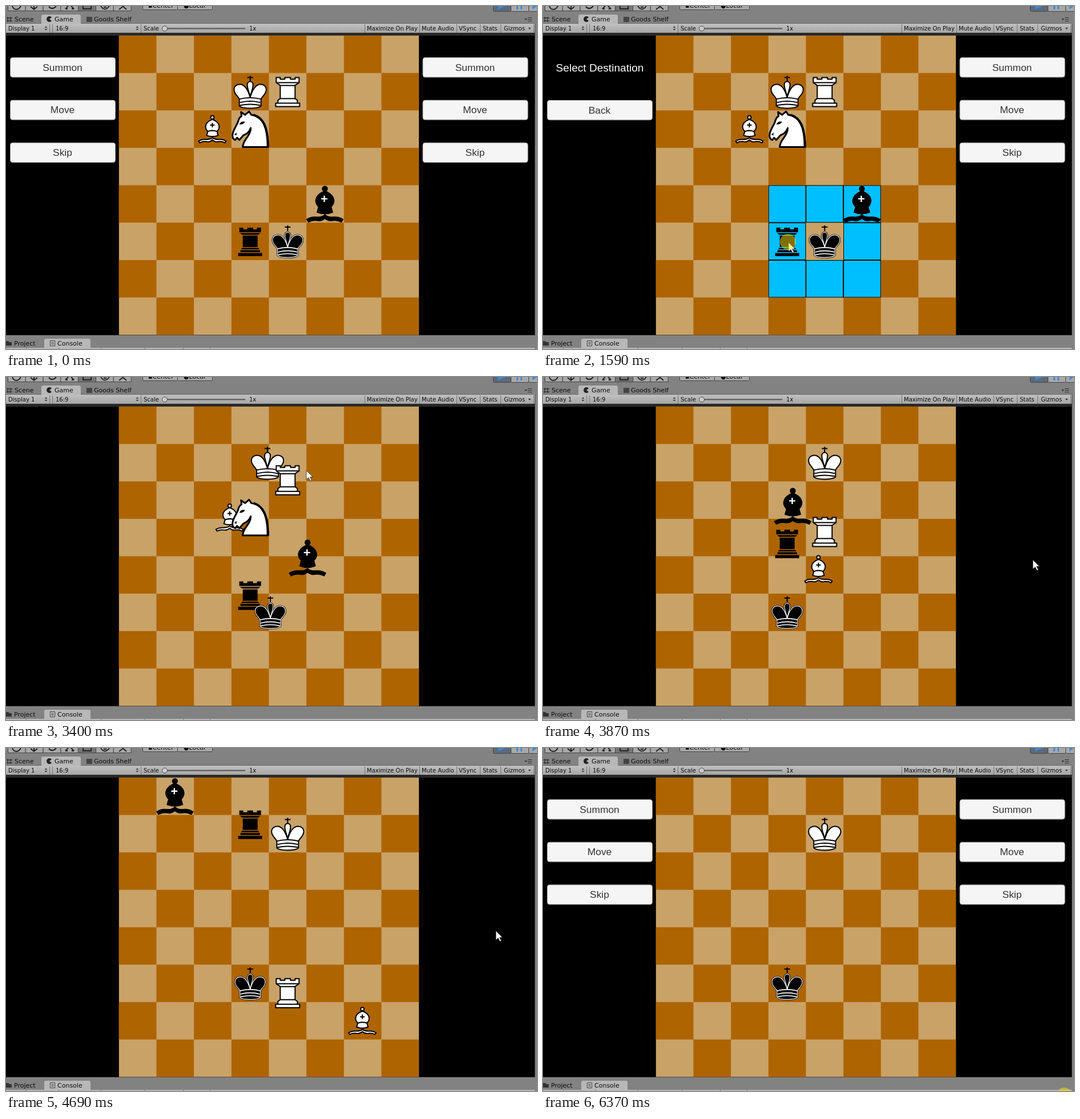
An HTML page that plays this animation: 930x602 px, repeating every 6470 ms.

```html
<!DOCTYPE html>
<html lang="en">
<head>
<meta charset="utf-8">
<title>Chess skirmish</title>
<style>
  html, body { margin: 0; height: 100%; overflow: hidden; background: #828282; }
  svg { display: block; width: 100vw; height: 100vh; }
  .ui { font: 10px "DejaVu Sans", sans-serif; fill: #0c0c0c; }
  .tab { font-size: 11px; }
  .panel { font: 17.4px "Liberation Sans", Arial, sans-serif; text-anchor: middle; fill: #323232; }
  .panel rect { fill: #f5f5f5; stroke: #9a9a9a; }
  .panel .label { font-size: 19.1px; fill: #fff; }
  .ring rect { fill: #00bfff; stroke: #000; }
  .white { fill: #fff; stroke: #000; stroke-width: 2; stroke-linejoin: round; }
  .black { fill: #000; }
  .line { fill: none; }
</style>
</head>
<body>
<svg id="stage" viewBox="0 0 930 602" preserveAspectRatio="none">
  <defs>
    <linearGradient id="bar" x2="0" y2="1"><stop stop-color="#c0c0c0"/><stop offset="1" stop-color="#a6a6a6"/></linearGradient>
    <g id="crown">
      <path d="M0 10C-4-4-10-13-18-13C-25-13-29-8-28-2C-27 5-21 8-19 13V25Q-15 29 0 29T19 25V13C21 8 27 5 28-2C29-8 25-13 18-13C10-13 4-4 0 10Z"/>
      <path d="M0 10C-1 2-5-5-5-12C-5-20 5-20 5-12C5-5 1 2 0 10Z"/>
    </g>
    <path id="bands" d="M-19 13Q0 8 19 13M-18 19Q0 14 18 19M-18 24Q0 20 18 24"/>
    <path id="cross" d="M0-28V-18M-5-25H5" fill="none" stroke="#000" stroke-width="2"/>
    <g id="bishop">
      <path d="M0 15C-4 19-9 18-14 18Q-19 18-24 21L-22 24Q-16 21-11 22C-6 23-3 22 0 19C3 22 6 23 11 22Q16 21 22 24L24 21Q19 18 14 18C9 18 4 19 0 15Z"/>
      <path d="M-8 4L-10 11Q0 15 10 11L8 4Q0 1-8 4Z"/>
      <path d="M-8 4C-16-4-11-13 0-17C11-13 16-4 8 4Q0 1-8 4Z"/>
      <circle cy="-20.500" r="3"/>
    </g>

    <g id="whiteKing" class="white"><use href="#cross"/><use href="#crown"/><use href="#bands" class="line"/></g>
    <g id="blackKing" class="black" stroke-linejoin="round">
      <use href="#cross"/>
      <g transform="translate(0 1) scale(.94)">
        <use href="#crown" stroke="#000" stroke-width="3"/>
        <use href="#crown" stroke="#fff" stroke-width="1.200"/>
        <use href="#bands" class="line" stroke="#fff" stroke-width="1.800"/>
      </g>
    </g>
    <g id="whiteRook" class="white">
      <path d="M-20-25H-13V-22H-5V-25H5V-22H13V-25H20V-16L13-11V12L17 15V20H21V26H-21V20H-17V15L-13 12V-11L-20-16Z"/>
      <path class="line" d="M-19-16H19M-13-11H13M-13 12H13M-17 20H17"/>
    </g>
    <path id="blackRook" class="black" d="M-19-24H-12V-21H-5V-24H5V-21H12V-24H19V-16H-19ZM-18-14.500H18L14-11.500H-14ZM-13-10H13V10H-13ZM-14 11.500H14L16 14H-16ZM-17 15.500H17V19H-17ZM-21 20.500H21V26H-21Z"/>
    <g id="whiteBishop" class="white" transform="translate(-.5)"><use href="#bishop"/><path d="M-4-7H4M0-11V-3"/></g>
    <g id="blackBishop" class="black" transform="translate(-.5)">
      <use href="#bishop" transform="scale(1.3)" stroke="#000" stroke-width="2"/>
      <path d="M-6.500-9H4.500M-1-14.500V-3.500" stroke="#fff" stroke-width="2.400"/>
    </g>
    <g id="knight" class="white">
      <path stroke-width="3" d="M-16-30L-9-25L-2-31L2-25C20-23 31-5 31.500 31.500H-13C-13 18 1 13 1-2C-2 7-8 9-12 11L-19 19L-23 15L-26 19Q-31 18-31 11C-31 2-22-8-21-14Q-19-21-15-23Z"/>
      <path class="line" stroke-width="4" d="M6-25C22-20 31-5 31 31"/>
      <path class="black" stroke="none" d="M-19-8Q-16-15-9-13Q-11-8-19-8ZM-28 10L-24 6L-24 11Z"/>
    </g>
  </defs>

  <rect width="930" height="602" fill="#828282"/>
  <g id="toolbar" stroke="#444"></g>
  <path d="M11 0Q13 6 18 6T26 0M43 1L49 6L55 1M49 0V5M75 1Q81 8 88 0M104 5L109 0M119 5L114 0M104 5H108M119 5H115M135 0V5H149V0M166 0Q173 11 181 0M171 2H176M198 6L206 0M211 6L204 0" fill="none" stroke="#222" stroke-width="2"/>
  <g class="ui tab"><text x="249" y="3">▪Center</text><text x="311" y="3">●Local</text></g>
  <path d="M862 0L875 0L862 6Z M894 0H897V6H894Z M901 0H904V6H901Z M922 0H930L922 6Z" fill="#3f8ad8"/>

  <path d="M62 31V18Q62 15 65 15H128Q131 15 131 18V31Z" fill="#b8b8b8"/>
  <rect y="31" width="926" height="16" fill="url(#bar)"/>
  <path d="M0 30.500H62M131 30.500H926" stroke="#666"/>
  <path d="M76.500 32V47M81.500 32V47M236.500 32V47M628.500 32V47M724.500 32V47M789.500 32V47M830.500 32V47M866.500 32V47M924.500 32V47" stroke="#757575"/>
  <path d="M3 19V28M8 19V28M1 21H11M1 26H11" stroke="#333" stroke-width="1.300"/>
  <path d="M80 20A5 5 0 1 0 80 26L76 23Z" fill="#222"/>
  <rect x="141" y="19" width="10" height="9" fill="#444"/>
  <g class="ui tab" fill="#222">
    <text x="15" y="27">Scene</text><text x="85" y="27">Game</text><text x="154" y="27">Goods Shelf</text>
  </g>
  <path d="M908 22H913L910.500 25ZM914 20H921V21H914ZM914 23H921V24H914ZM914 26H921V27H914ZM914.500 38H919.500L917 41ZM67.500 38H72.500L70 35.500ZM67.500 40H72.500L70 42.500ZM227.500 38H232.500L230 35.500ZM227.500 40H232.500L230 42.500Z" fill="#333"/>
  <g class="ui">
    <text x="4" y="43">Display 1</text><text x="87" y="43">16:9</text><text x="241" y="43">Scale</text><text x="426" y="43">1x</text>
    <text x="632" y="43">Maximize On Play</text><text x="728" y="43">Mute Audio</text><text x="793" y="43">VSync</text>
    <text x="835" y="43">Stats</text><text x="872" y="43">Gizmos</text>
  </g>
  <path d="M278 39.500H419" stroke="#555" stroke-width="2"/>
  <circle cx="278" cy="39.500" r="4.500" fill="#ccc" stroke="#444"/>

  <rect y="47" width="926" height="531" fill="#282828"/>
  <rect y="52" width="926" height="525" fill="#000"/>
  <path d="M926.500 31V578" stroke="#555"/>

  <path d="M67 602V587Q67 584 70 584H145Q148 584 148 587V602Z" fill="#b8b8b8"/>
  <rect y="600" width="926" height="2" fill="#b8b8b8"/>
  <path d="M35.500 600V602M92.500 600V602M166.500 600V602M243.500 600V602M310.500 600V602M357.500 600V602" stroke="#777"/>
  <path d="M0 588H4L6 590H10V596H0Z" fill="#333"/>
  <path d="M77.500 587.500H85.500V596.500H77.500ZM79 590H84M79 592H84M79 594H84" fill="#ddd" stroke="#333"/>
  <g class="ui tab"><text x="14" y="596">Project</text><text x="90" y="596">Console</text></g>

  <g id="board"></g>
  <g id="pieces"></g>
  <g id="panels"></g>
  <g id="cursor">
    <path d="M0 0V16L4 12.500L7 18.500L9.500 17.500L6.500 11.500H11.500Z" fill="#fff" stroke="#222" stroke-width=".8"/>
    <circle id="press" cx="-1" cy="-1" r="14" fill="#ffe000" fill-opacity=".5"/>
  </g>
</svg>
<script>
const LOOP = 6470, CELL = 65.67, LEFT = 197.8, TOP = 51.9;
const MARCH = 3244, SPEED = 0.193, CLEANUP = 5390;
const byId = id => document.getElementById(id);
const clamp = (v, lo, hi) => Math.min(hi, Math.max(lo, v));

function add(parent, tag, attrs, text = "") {
  const node = document.createElementNS("http://www.w3.org/2000/svg", tag);
  for (const name in attrs) node.setAttribute(name, attrs[name]);
  node.textContent = text;
  return parent.appendChild(node);
}
const show = (node, on) => node.setAttribute("display", on ? "inline" : "none");

function square(parent, col, row, size, attrs = {}, inset = 0) {
  const side = size * CELL - 2 * inset;
  add(parent, "rect", { x: LEFT + col * CELL + inset, y: TOP + row * CELL + inset, width: side, height: side, ...attrs });
}

function ring(col, row) {
  const group = add(byId("board"), "g", { class: "ring" });
  for (let dy = -1; dy <= 1; dy++)
    for (let dx = -1; dx <= 1; dx++)
      if (dx || dy) square(group, col + dx, row + dy, 1, {}, 0.5);
  return group;
}

function panel(x, buttons, label) {
  const group = add(byId("panels"), "g", { class: "panel", transform: `translate(${x})` });
  if (label) add(group, "text", { class: "label", x: 92.5, y: 115 }, label);
  buttons.forEach((name, i) => {
    const y = (label ? 165 : 90) + i * 74.8;
    add(group, "rect", { x: 0.5, y: y + 0.5, width: 184, height: 34.5, rx: 4 });
    add(group, "text", { x: 92, y: y + 23.6 }, name);
  });
  return group;
}

// Toolbar buttons: x, width, fill
for (let i = 0; i < 7; i++)
  add(byId("toolbar"), "rect", { x: 3.5 + i * 30.8, y: -9.5, width: 30.8, height: 18, fill: i == 4 ? "#777" : "#a8a8a8" });
for (const [x, width, fill] of [[239.5, 61, "#a8a8a8"], [300.5, 61, "#a8a8a8"], [853.5, 31, "#5b6a7c"], [884.5, 31, "#a8a8a8"], [915.5, 31, "#a8a8a8"]])
  add(byId("toolbar"), "rect", { x, y: -9.5, width, height: x > 800 ? 19 : 16, rx: 2, fill });

square(byId("board"), 0, 0, 8, { fill: "#c9a267" });
for (let row = 0; row < 8; row++)
  for (let col = row % 2; col < 8; col += 2)
    square(byId("board"), col, row, 1, { fill: "#ae6400" });

const rings = { black: ring(4, 5), white: ring(3, 1) };
const ACTIONS = ["Summon", "Move", "Skip"];
const [leftMenu, rightMenu] = [7, 729.5].map(x => panel(x, ACTIONS));
const [leftPick, rightPick] = [7, 729.5].map(x => panel(x, ["Back"], "Select Destination"));

// Shape, column, row, direction, squares travelled, time of removal
const pieces = [
  ["whiteKing", 3, 1, 1, 0, 1, LOOP],
  ["whiteRook", 4, 1, 0, 1, 5, CLEANUP],
  ["whiteBishop", 2, 2, 1, 1, 4, CLEANUP],
  ["knight", 3, 2, 0, 1, 5, 3650],
  ["blackRook", 3, 5, 0, -1, 5, CLEANUP],
  ["blackBishop", 5, 4, -1, -1, 4, CLEANUP],
  ["blackKing", 4, 5, -1, 0, 1, LOOP]
].map(([shape, col, row, dx, dy, squares, gone]) => ({
  node: add(byId("pieces"), "use", { href: "#" + shape }),
  x: LEFT + (col + 0.5) * CELL, y: TOP + (row + 0.5) * CELL, dx, dy, reach: squares * CELL, gone
}));

// Cursor stops: time, x, y
const stops = [
  [0, 862, 625], [100, 850, 590], [720, 165, 200], [900, 110, 185], [1060, 110, 185],
  [1400, 430, 415], [1660, 430, 415], [2040, 752, 205], [2220, 828, 187], [2640, 828, 187],
  [3020, 495, 150], [3260, 495, 150], [3400, 526, 164], [3850, 858, 321], [4790, 858, 321],
  [4990, 858, 324], [5340, 858, 324], [5560, 885, 576], [5610, 914, 625], [6365, 914, 625],
  [6366, 914, 611], [LOOP, 914, 611]
];
const presses = [[930, 1030], [1490, 1650], [2280, 2400], [3100, 3220], [6366, LOOP]];
const between = (t, a, b) => t >= a && t < b;

function cursorAt(t) {
  const i = stops.findIndex(stop => stop[0] > t);
  const [t0, x0, y0] = stops[i - 1], [t1, x1, y1] = stops[i];
  const u = (t - t0) / (t1 - t0), k = u * u * (3 - 2 * u);
  return [x0 + (x1 - x0) * k, y0 + (y1 - y0) * k];
}

function draw(t) {
  for (const p of pieces) {
    const d = clamp((t - MARCH) * SPEED, 0, p.reach);
    p.node.setAttribute("transform", `translate(${p.x + p.dx * d} ${p.y + p.dy * d})`);
    show(p.node, t < p.gone);
  }
  const blackPicks = between(t, 1000, 1650), whitePicks = between(t, 2350, 3220);
  show(rings.black, blackPicks);
  show(leftPick, blackPicks);
  show(rings.white, whitePicks);
  show(rightPick, whitePicks);
  show(leftMenu, t < 1000 || t >= CLEANUP);
  show(rightMenu, t < 2350 || t >= CLEANUP);
  byId("cursor").setAttribute("transform", `translate(${cursorAt(t)})`);
  show(byId("press"), presses.some(([a, b]) => between(t, a, b)));
}

const start = performance.now();
function tick() {
  draw((performance.now() - start) % LOOP);
  requestAnimationFrame(tick);
}
tick();
</script>
</body>
</html>
```
